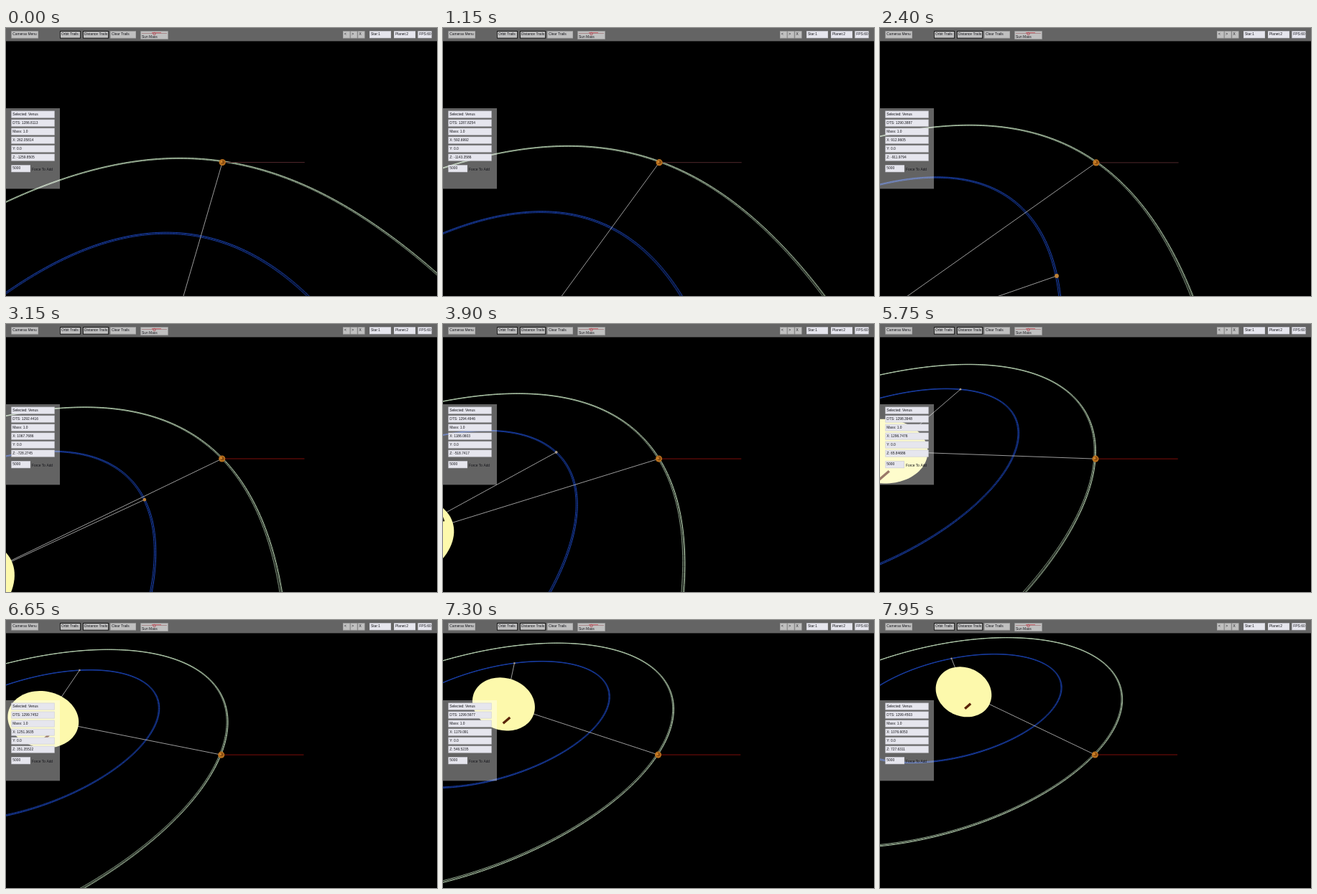
These frames come from a looping animation (600 px wide and 374 px high, 8 s). An HTML page with a canvas:

```html
<!DOCTYPE html>
<html>
<head>
<meta charset="utf-8">
<style>
html, body { margin: 0; width: 100%; height: 100%; overflow: hidden; background: #000; }
canvas { display: block; }
</style>
</head>
<body>
<canvas id="stage" width="600" height="374"></canvas>
<script>
const ctx = document.getElementById('stage').getContext('2d');
const LOOP = 8000, STEP = 50, RAD = Math.PI / 180;
const FOCAL = 187 / Math.tan(30 * RAD); // 60 degree field of view
const TILT = Math.SQRT1_2;              // camera looks down at 45 degrees
const CAMERA_DISTANCE = 1000 * Math.SQRT2;
const SUN_RADIUS = 200;

// time, x, z, displayed distance to sun
const track = [
  [0, 262.05814, -1259.8505, 1286.8113],
  [1150, 592.69916, -1143.3586, 1287.8254],
  [2400, 912.9605, -911.9794, 1290.3887],
  [3900, 1186.0603, -518.7417, 1294.4946],
  [4900, 1280.6149, -206.4961, 1297.1195],
  [6650, 1251.3635, 351.35522, 1299.7452],
  [7950, 1076.6053, 727.6311, 1299.4503]
].map(([time, x, z, shown]) => ({ time, shown, angle: Math.atan2(z, x), radius: Math.hypot(x, z) }));

let target = { x: 0, z: 0 };

const polar = (radius, angle) => ({ x: radius * Math.cos(angle), z: radius * Math.sin(angle) });

function venusAt(t) {
  let i = 0;
  while (i < track.length - 2 && t >= track[i + 1].time) i++;
  const a = track[i], b = track[i + 1], k = (t - a.time) / (b.time - a.time);
  const mix = key => a[key] + (b[key] - a[key]) * k;
  return { angle: mix('angle'), radius: mix('radius'), shown: mix('shown') };
}

function toView({ x, z }) {
  const dx = x - target.x, dz = z - target.z;
  return [dx, -dz * TILT, CAMERA_DISTANCE - dz * TILT];
}

const toScreen = ([x, y, depth]) => [300 + FOCAL * x / depth, 187.3 - FOCAL * y / depth];

function segment(a, b, color, width = 1) {
  ctx.strokeStyle = color;
  ctx.lineWidth = width;
  ctx.beginPath();
  ctx.moveTo(...toScreen(toView(a)));
  ctx.lineTo(...toScreen(toView(b)));
  ctx.stroke();
}

function ring(radiusAt, color) {
  ctx.strokeStyle = color;
  ctx.lineWidth = .9;
  ctx.beginPath();
  let open = false;
  for (let deg = 0; deg <= 360; deg++) {
    const v = toView(polar(radiusAt(deg * RAD), deg * RAD));
    if (v[2] < 60) { open = false; continue; }
    const p = toScreen(v);
    if (open) ctx.lineTo(...p); else ctx.moveTo(...p);
    open = true;
  }
  ctx.stroke();
}

function disc(place, radius, color, minimum = 1) {
  const v = toView(place), [x, y] = toScreen(v);
  if (v[2] < 60) return;
  const size = Math.max(minimum, radius * FOCAL / v[2]);
  ctx.fillStyle = color;
  ctx.beginPath();
  ctx.arc(x, y, size, 0, 7);
  ctx.fill();
}

// Exact perspective outline of the sun's sphere
function drawSun() {
  const v = toView({ x: 0, z: 0 });
  const dist = Math.hypot(...v), shrink = 1 - (SUN_RADIUS / dist) ** 2;
  const r = SUN_RADIUS * Math.sqrt(shrink), flat = Math.hypot(v[0], v[2]);
  const u = [v[2] / flat, 0, -v[0] / flat];
  const w = [-v[0] * v[1] / (dist * flat), flat / dist, -v[1] * v[2] / (dist * flat)];
  ctx.fillStyle = '#fdf9ac';
  ctx.beginPath();
  for (let i = 0; i < 90; i++) {
    const c = r * Math.cos(i * 4 * RAD), s = r * Math.sin(i * 4 * RAD);
    ctx.lineTo(...toScreen(v.map((n, j) => n * shrink + u[j] * c + w[j] * s)));
  }
  ctx.fill();
}

function label(text, x, y) {
  ctx.fillStyle = '#15151a';
  ctx.font = '4.9px "Liberation Sans", Arial, sans-serif';
  ctx.fillText(text, x, y);
}

function box(text, x, y, w, h, fill, edge) {
  ctx.fillStyle = edge;
  ctx.fillRect(x, y, w, h);
  ctx.fillStyle = fill;
  ctx.fillRect(x + .8, y + .8, w - 1.6, h - 1.6);
  label(text, x + 2, y + 6.2);
}
const button = (text, x, w, edge = '#a4a4a4') => box(text, x, 4.2, w, 10.3, '#c0c0c0', edge);
const field = (text, x, y, w) => box(text, x, y, w, 10, '#e6e6ee', '#d2d2da');

const decimals = n => String(Number(n.toFixed(Math.abs(n) >= 512 ? 4 : 5)));

function drawToolbar() {
  ctx.fillStyle = '#646464';
  ctx.fillRect(0, 0, 600, 18.4);
  button('Cameras Menu', 7.3, 37.7);
  button('Orbit Trails', 75, 29, '#000');
  button('Distance Trails', 107, 36, '#000');
  button('Clear Trails', 145, 36);
  box('', 187.3, 4.2, 38.5, 11.6, '#c0c0c0', '#a4a4a4');
  ctx.fillStyle = '#a98a8c';
  ctx.fillRect(189, 7, 35, 1);
  ctx.fillStyle = '#c46a72';
  ctx.fillRect(203, 6, 13, 1);
  ctx.strokeStyle = '#b4525c';
  ctx.lineWidth = 1;
  ctx.beginPath();
  ctx.arc(206.5, 8, 1.7, 0, 7);
  ctx.stroke();
  label('Sun Mass', 189, 14);
  ['<', '>', 'X'].forEach((text, i) => button(text, 469 + i * 10.3, 10));
  field('Star:1', 506, 4.2, 30);
  field('Planet:2', 540, 4.2, 30);
  field('FPS:60', 573.3, 4.2, 19.4);
}

function drawPanel(place, shown) {
  ctx.fillStyle = 'rgba(255,255,255,.39)';
  ctx.fillRect(0, 112, 75, 112.4);
  [
    'Selected: Venus',
    'DTS: ' + decimals(shown),
    'Mass: 1.0',
    'X: ' + decimals(place.x),
    'Y: 0.0',
    'Z: ' + decimals(place.z)
  ].forEach((text, i) => field(text, 7.3, 115.6 + i * 12, 60.4));
  field('5000', 7.3, 191.2, 26.7);
  label('Force To Add', 36, 198.5);
}

function draw(t) {
  const orbit = venusAt(t);
  const venus = polar(orbit.radius, orbit.angle);
  const mercury = polar(794, (25.2 - 0.0184 * t) * RAD);
  const sun = { x: 0, z: 0 };
  target = polar(orbit.radius, orbit.angle - .0041); // camera trails by one tick

  ctx.fillStyle = '#000';
  ctx.fillRect(0, 0, 600, 374);

  ring(() => 789, '#1a3fa8');
  ring(() => 793, '#112c74');
  ring(() => 797, '#1c46b8');
  ring(a => 1291 - 2 * Math.cos(a), '#94aa90');
  ring(() => 1295, '#869a82');
  ring(() => 1299, '#bcd6b6');

  segment(venus, { x: venus.x + 500, z: venus.z }, t < 3000 ? '#50282c' : '#7e0e0a');
  segment(sun, venus, '#b8b8b8', .85);
  if (toView(mercury)[2] > 60) segment(sun, mercury, '#b8b8b8', .85);
  disc(mercury, 8.5, t < 3200 ? '#bd8136' : '#a89a88');

  drawSun();
  if (t < 5500) segment({ x: 126, z: -129 }, { x: 159, z: -96 }, '#2a2414', 2);
  segment({ x: 92, z: 235 }, { x: 109, z: 166 }, '#5a2408', 3.4);

  disc(venus, 20, '#b8701e');
  disc({ x: venus.x + 2, z: venus.z - 2 }, 11, '#8a4c10');
  disc({ x: venus.x - 5, z: venus.z - 5 }, 6, '#d68c30');

  drawPanel(venus, orbit.shown);
  drawToolbar();
}

const start = performance.now();
function frame() {
  const t = (performance.now() - start) % LOOP;
  draw(Math.floor(t / STEP) * STEP);
  requestAnimationFrame(frame);
}
frame();
</script>
</body>
</html>
```
